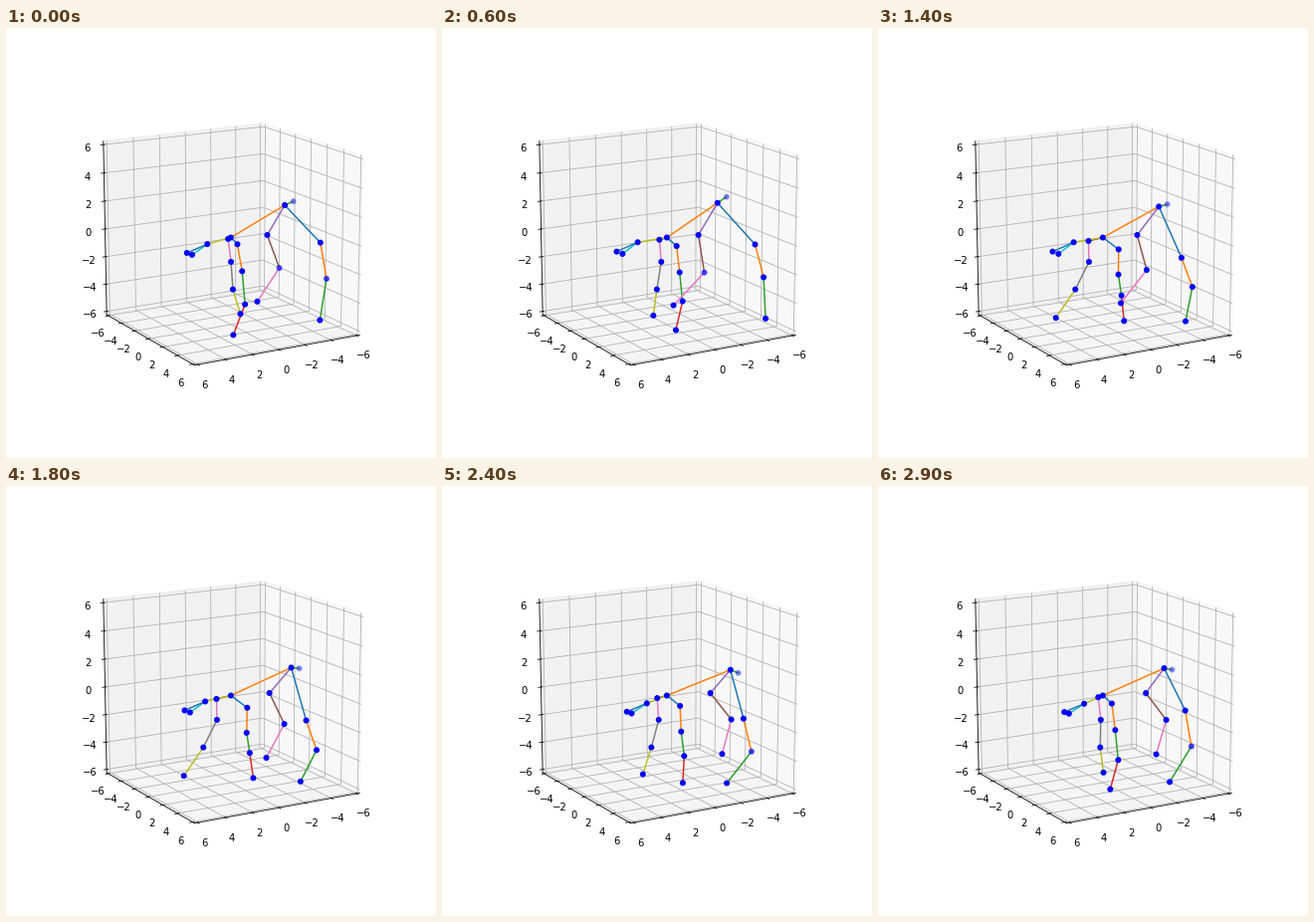
Recreate the animation shown at these times as a matplotlib script. Size 432 by 432 pixels, loop 3000 ms.

```python
import numpy as np
import matplotlib.pyplot as plt
from matplotlib.animation import FuncAnimation

FRAMES, INTERVAL = 30, 100
STRIDE = 36  # frames in one full stride
ROOT = (225.9, 210.5)

joints = [(*ROOT, 0, 0, 0)]  # rest x, rest y, sway x, sway y, peak frame
bones = []  # start joint, end joint, colour


def limb(parent, color, peak, lag, *parts):
    """Chain joints that sway around their rest points; return their indices."""
    chain = []
    for i, part in enumerate(parts):
        joints.append((*part, peak + i * lag))
        end = len(joints) - 1
        bones.append((parent, end, f"C{(color + i) % 10}"))
        chain.append(end)
        parent = end
    return chain


# Fore legs
limb(0, 0, 17, 0, (237.4, 220, 5, 2.8), (239.5, 246.1, 2.3, 1.8),
     (242.5, 272.9, 2.4, -4.8), (238.4, 300.9, 10.2, -7.6))
limb(0, 5, 16, 0, (217.3, 212.9, -6.2, 1.1), (219, 234.9, -7.5, 0),
     (213.1, 262.6, -15.8, 0), (207.1, 289.2, -30.2, 2.1))

# Neck and muzzle
neck, _ = limb(0, 8, 10, 0, (201.2, 216.8, -6, -2), (185.9, 227.7, -6, -1))
limb(neck, 0, 10, 0, (180.6, 225.7, -6.7, -1.4))

# Back, tail and hind legs
rump, tail = limb(0, 1, 24, 0, (283.3, 180.2, 6.5, 4.5), (291.7, 178.7, 5.9, 9.1))
_, hock_a, _ = limb(rump, 0, 20, 2, (308.7, 225.6, -7.6, 10.6),
                    (317, 258.6, -6.5, 8.7), (305.6, 295.2, -19.5, 3.3))
_, hock_b, _ = limb(rump, 4, 26, 0, (263.6, 208, 6.4, 0),
                    (277.1, 240.1, 14.4, -5.9), (257, 273.9, 26, -5))

rig = np.array(joints, float)
rest, sway, peaks = rig[:, :2], rig[:, 2:4], rig[:, 4]


def swing(frame, peak):
    return np.cos(2 * np.pi * (frame - peak) / STRIDE)


def pose(frame):
    return rest + sway * swing(frame, peaks)[:, None]


def joint_colors(frame):
    """Blue joints, paler while they are farthest from the viewer."""
    rgba = np.tile([0.0, 0.0, 1.0, 1.0], (len(rig), 1))
    rgba[tail, 3] = 0.35
    for hock, far_peak in ((hock_a, 30), (hock_b, 0)):
        if swing(frame, far_peak) > 0.4:
            rgba[hock, 3] = 0.6
    return rgba


fig = plt.figure(figsize=(6, 6), dpi=72)

box = fig.add_axes([0.125, 0.125, 0.775, 0.755], projection="3d")
box.apply_aspect = lambda position=None: None  # keep the slightly wide box
box.set_box_aspect((1, 1, 1), zoom=0.946753)
box.view_init(elev=15, azim=60)
ticks = np.arange(-6, 7, 2)
box.set(xticks=ticks, yticks=ticks, zticks=ticks)
box.set(xlim=(-6.25, 6.25), ylim=(-6.25, 6.25), zlim=(-6.25, 6.25))

stage = fig.add_axes([0, 0, 1, 1])
stage.axis("off")
lines = [stage.plot([], [], color=color, lw=1.5)[0] for _, _, color in bones]
dots = stage.scatter(*pose(0).T, s=20, c=joint_colors(0), edgecolors="face",
                     linewidths=1.5, zorder=3)
stage.set(xlim=(0, 432), ylim=(432, 0))


def draw(frame):
    points = pose(frame)
    for line, (a, b, _) in zip(lines, bones):
        line.set_data(*points[[a, b]].T)
    dots.set_offsets(points)
    dots.set_facecolors(joint_colors(frame))
    return [*lines, dots]


anim = FuncAnimation(fig, draw, frames=FRAMES, interval=INTERVAL, repeat=True)
plt.show()
```
